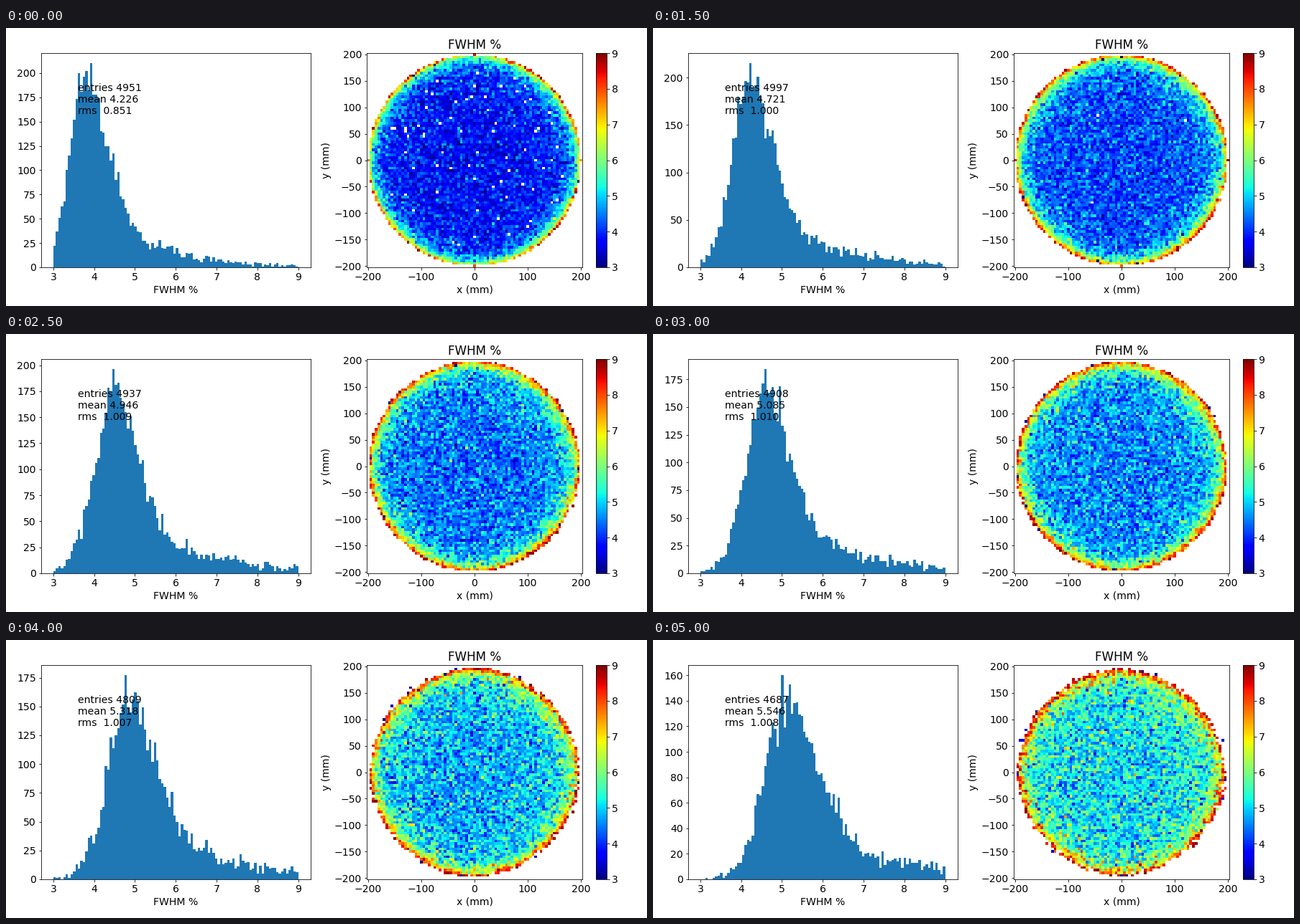
A matplotlib script that plays this animation: 892x388 px, repeating every 5.5 s.

```python
import numpy as np
import matplotlib.pyplot as plt
from matplotlib.animation import FuncAnimation

W, H, DPI = 892, 388, 72
STEPS, INTERVAL = 11, 500
LO, HI, BINS = 3, 9, 100
R, CELL = 40, 5     # disc radius in cells, cell size in mm

plt.rcParams.update({"font.family": "DejaVu Sans", "font.size": 14})

# Readouts at the key steps; the steps between are interpolated.
KEYS = [0, 2, 3, 5, 6, 8, 10]
ENTRIES = [4951, 5013, 4997, 4937, 4908, 4809, 4687]
MEAN = [4.226, 4.562, 4.721, 4.946, 5.085, 5.318, 5.546]
RMS = [0.851, 0.971, 1.000, 1.009, 1.010, 1.007, 1.008]
PEAK = [210, 225, 215, 196, 184, 177, 160]

edges = np.linspace(LO, HI, BINS + 1)
centers = (edges[:-1] + edges[1:]) / 2

gy, gx = np.mgrid[-R:R + 1, -R:R + 1]
disc = gx**2 + gy**2 <= R**2
r = np.hypot(gx, gy)[disc] / R
theta = np.arctan2(gy, gx)[disc]
inner = np.flatnonzero(r < 0.87)
rim = np.flatnonzero(r > 0.965)
static_noise = np.random.default_rng(7).normal(size=r.size)
profile = (0.45 * r**4 + 2.0 * r**14 + 1.8 * r**40
           - 0.3 * r**8 * np.cos(4 * theta)
           + 0.12 * r**3 * np.cos(theta - 0.5))


def at(step, values):
    return float(np.interp(step, KEYS, values))


def spectrum(step, rng):
    """Gaussian rise, wider Gaussian fall and an exponential tail, with counting noise."""
    peak = round(at(step, PEAK))
    d = centers - (3.83 + 0.134 * step)
    rise = np.exp(-0.5 * (d / (0.40 + 0.018 * step))**2)
    fall = (0.65 * np.exp(-0.5 * (d / (0.52 + 0.002 * step**2))**2)
            + 0.35 * np.exp(-np.abs(d) / (1.4 + 0.07 * step)))
    h = (0.95 - 0.009 * step) * peak * np.where(d < 0, rise, fall)
    h += 0.8 * np.sqrt(h) * rng.normal(size=BINS)
    h = np.clip(np.round(h), 0, round(0.96 * peak))
    h[np.searchsorted(edges, 3.93 + 0.108 * step) - 1] = peak
    return h


def width_map(step, counts, rng):
    """Rank the cells by a radial score and give them widths from the spectrum."""
    noise = 0.6 * static_noise + 0.8 * rng.normal(size=r.size)
    score = profile + (0.36 + 0.15 * r**8) * noise
    low = round(70 * np.exp(-step))
    score[rng.choice(rim, 3 + step, replace=False)] = -5
    score[rng.choice(inner, low, replace=False)] = -9

    n = round(at(step, ENTRIES))
    cum = np.concatenate([[0], np.cumsum(counts)])
    values = np.full(r.size, np.nan)
    order = np.argsort(score)[low:low + n]
    values[order] = np.interp((np.arange(n) + 0.5) / n * cum[-1], cum, edges)

    grid = np.full(disc.shape, np.nan)
    grid[disc] = values
    return grid


def make_step(step):
    rng = np.random.default_rng(100 + step)
    counts = spectrum(step, rng)
    return counts, width_map(step, counts, rng)


data = [make_step(i) for i in range(STEPS)]

fig, (ax_hist, ax_map) = plt.subplots(1, 2, figsize=(W / DPI, H / DPI), dpi=DPI,
                                      facecolor="white")

bars = ax_hist.bar(centers, data[0][0], width=edges[1] - edges[0], color="#1f77b4")
ax_hist.set_xlim(2.7, 9.3)
ax_hist.set_xticks(range(LO, HI + 1))
ax_hist.set_xlabel("FWHM %")
stats = ax_hist.text(3.6, 0, "")

half = (R + 0.5) * CELL
image = ax_map.imshow(data[0][1], cmap="jet", vmin=LO, vmax=HI, origin="lower",
                      extent=[-half, half, -half, half], aspect="auto",
                      interpolation="nearest")
ax_map.set_xticks(range(-200, 201, 100))
ax_map.set_yticks(range(-200, 201, 50))
ax_map.set_xlabel("x (mm)")
ax_map.set_ylabel("y (mm)")
ax_map.set_title("FWHM %")
fig.colorbar(image, ax=ax_map, ticks=range(LO, HI + 1))


def update(step):
    counts, grid = data[step]
    for bar, h in zip(bars, counts):
        bar.set_height(h)
    peak = counts.max()
    ax_hist.set_ylim(0, 1.05 * peak)
    stats.set_y(0.75 * peak)
    stats.set_text(f"entries {at(step, ENTRIES):.0f}\n"
                   f"mean {at(step, MEAN):.3f}\n"
                   f"rms  {at(step, RMS):.3f}")
    image.set_data(grid)
    return [*bars, stats, image]


update(0)
fig.tight_layout()

anim = FuncAnimation(fig, update, frames=STEPS, interval=INTERVAL,
                     repeat=True, repeat_delay=0, blit=False)
plt.show()
```
